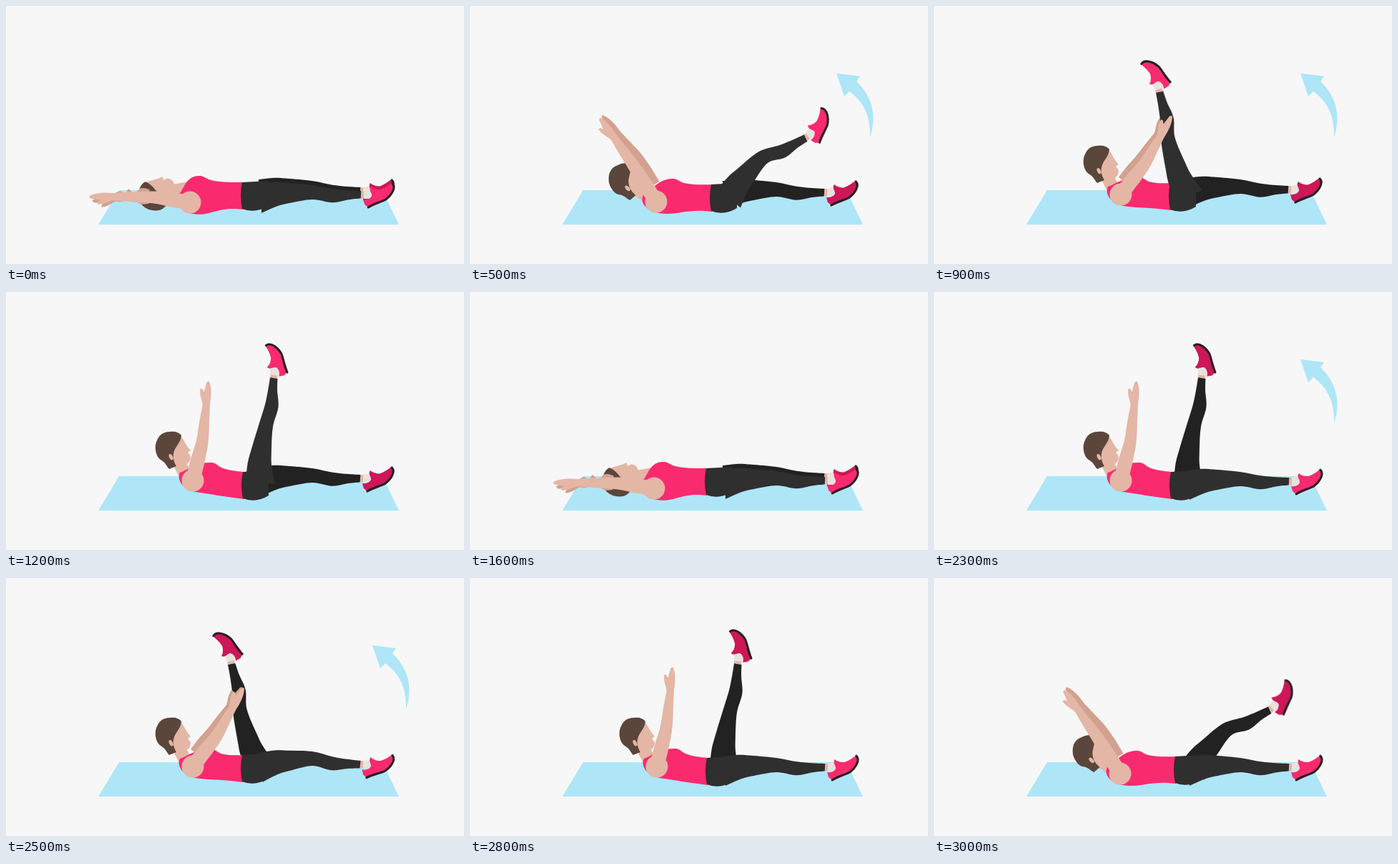
Recreate the animation shown at these times as an HTML page. Size 640 by 360 pixels, loop 3200 ms.

```html
<!DOCTYPE html>
<html lang="en">
<head>
<meta charset="utf-8">
<title>Single-leg stretch</title>
<style>
  html, body { margin: 0; width: 100%; height: 100%; overflow: hidden; background: #f7f7f7; }
  svg { display: block; width: 100%; height: 100%; }
</style>
</head>
<body>
<svg id="stage" viewBox="0 0 640 360"></svg>
<script>
const LOOP = 3200;
const MAT = '#aee6f8', SKIN = '#e4b6a5', TAN = '#d3a190', HAIR = '#5a463b', SOCK = '#e8e2df', SOLE = '#222';
const NEAR = { pants: '#2f2f2f', shoe: '#fa2a6e' };
const FAR = { pants: '#222222', shoe: '#cd1757' };

// Limb outlines: [place along the two bones 0..2, front width, back width].
const LEG = [[0, 20, 21], [.3, 20, 14], [.55, 17, 11.5], [1, 10, 10], [1.42, 6, 13], [1.75, 5, 8], [2, 5, 5.5]];
const ARM = [[0, 10, 10], [.5, 10, 10], [1, 8.5, 8.5], [1.5, 7, 7], [2, 5, 5]];

// Joints are [x, y]; a head is [x, y, turn].
const POSES = {
  lie: { waist: [330, 246], head: [211, 262, -75], neck: [255, 254], strap: [240, 263], bust: [271, 237],
    arm: [[257, 274], [207, 267], [148, 266]], farArm: [[200, 266], [172, 264], [152, 267]] },
  mid: { waist: [337, 249], head: [219, 244, -20], neck: [250, 268], strap: [242, 264], bust: [284, 241],
    arm: [[260, 273], [230, 225], [200, 182]], farArm: [[256, 250], [233, 212], [205, 177]],
    up: [[362, 268], [410, 211], [469, 184]], flex: -18 },
  top: { waist: [331, 251], head: [233, 220, 0], neck: [254, 262], strap: [243, 252], bust: [287, 238],
    arm: [[261, 263], [274, 210], [280, 156]],
    up: [[355, 266], [363, 187], [374, 120]] },
  hold: { waist: [330, 247], head: [233, 220, 0], neck: [254, 262], strap: [243, 252], bust: [287, 239],
    arm: [[261, 263], [294, 221], [317, 181]], farArm: [[266, 245], [288, 216], [313, 179]],
    up: [[355, 264], [327, 186], [315, 120]] }
};
const REST = [[355, 269], [428, 261], [496, 264]];
const REST_HOLD = [[355, 264], [428, 252], [495, 260]];
const REST_FAR = [[355, 264], [428, 256], [495, 260]];
const shifted = (joints, dy) => joints.map(([x, y]) => [x, y + dy]);

const path = (d, fill) => `<path d="${d}" fill="${fill}"/>`;
const place = ([x, y], turn, art) => `<g transform="translate(${x} ${y}) rotate(${turn})">${art}</g>`;
const angle = ([ax, ay], [bx, by]) => Math.atan2(by - ay, bx - ax);
const degrees = (a, b) => angle(a, b) * 180 / Math.PI;

// Smooth open curve through points, without its starting move.
function curve(pts) {
  const at = i => pts[Math.max(0, Math.min(pts.length - 1, i))];
  const handle = (i, dir) => at(i).map((v, k) => v + dir * (at(i + 1)[k] - at(i - 1)[k]) / 6);
  return pts.slice(1).map((p, i) => `C${handle(i, 1)} ${handle(i + 1, -1)} ${p}`).join('');
}

function limb([a, b, c], profile, fill) {
  const first = angle(a, b), second = angle(b, c);
  const edge = (u, width) => {
    const [from, to, t] = u < 1 ? [a, b, u] : [b, c, u - 1];
    const dir = u === 1 ? (first + second) / 2 : u < 1 ? first : second;
    return [from[0] + (to[0] - from[0]) * t + Math.sin(dir) * width,
            from[1] + (to[1] - from[1]) * t - Math.cos(dir) * width];
  };
  const front = profile.map(([u, w]) => edge(u, w));
  const back = profile.map(([u, , w]) => edge(u, -w)).reverse();
  return path(`M${front[0]}${curve(front)}L${back[0]}${curve(back)}Z`, fill);
}

const foot = color =>
  path('M-4,-5H6V5H-4Z', SKIN) +
  path('M4,-5L14,-7L18,-1L13,6L4,6Z', SOCK) +
  path('M14,-11C17,-8 23,-6 28,-7C34,-9 39,-13 43,-16L47,-14C49,-5 41,4 35,8C28,12 20,15 11,19L5,14L3,7C8,8 13,6 15,2C16,-2 10,-6 14,-11Z', color) +
  `<path d="M44,-15.5C50,-9 42,2 35,7C28,11 19,12 10,18" fill="none" stroke="${SOLE}" stroke-width="3" stroke-linecap="round"/>`;

const leg = (joints, side, flex = -3) =>
  place(joints[2], degrees(joints[1], joints[2]) + flex, foot(side.shoe)) + limb(joints, LEG, side.pants);

const arm = (joints, fill) => limb(joints, ARM, fill) +
  place(joints[2], degrees(joints[1], joints[2]),
    path('M-2,-5C6,-7 10,-11 20,-11L20,-8L16,-5L30,-3L32,0C24,5 12,6 -2,5Z', fill));

const head =
  path('M10,-21C16,-14 18,-6 25,1L21,4L25,9C25,18 20,20 16,20C10,26 4,26 -2,22L-2,0Z', SKIN) +
  path('M12,-20C11,-8 2,-4 1,6C0,12 2,18 5,23L-5,27C-10,21 -10,18 -17,14C-23,10 -25,0 -24,-7C-21,-19 -15,-25 -4,-25C3,-26 9,-24 12,-20Z', HAIR) +
  `<ellipse cx="-2.5" cy="10" rx="2.5" ry="4.5" transform="rotate(-25 -2 10)" fill="${SKIN}"/>`;

function torso({ waist: [wx, wy], strap: [sx, sy], bust: [bx, by], arm: [[ax, ay]] }) {
  return path(`M${sx},${sy}C${sx + 8},${sy - 2} ${bx - 22},${by - 1} ${bx},${by}
    C${bx + 12},${by + 1} ${bx + 4},${by + 10} ${wx + 1},${wy}V${wy + 38}
    C${wx - 35},${wy + 33} ${ax + 30},${ay + 20} ${ax + 4},${ay + 16}
    C${ax - 8},${ay + 14} ${sx - 6},${sy + 14} ${sx},${sy}Z`, NEAR.shoe);
}
const pelvis = ({ waist }) => place(waist, 0, path('M0,0Q-4,18 0,37Q18,44 36,33V-2Z', NEAR.pants));

function figure(name, nearLeg, farLeg, nearFlex, farFlex) {
  const pose = POSES[name], [shoulder] = pose.arm;
  return leg(farLeg, FAR, farFlex) +
    `<path d="M${pose.head.slice(0, 2)}L${pose.neck}" stroke="${SKIN}" stroke-width="18"/>` +
    place(pose.head, pose.head[2], head) +
    (pose.farArm ? arm(pose.farArm, TAN) : '') +
    torso(pose) + leg(nearLeg, NEAR, nearFlex) + pelvis(pose) +
    `<circle cx="${shoulder[0]}" cy="${shoulder[1]}" r="15.5" fill="${SKIN}"/>` + arm(pose.arm, SKIN);
}
const nearUp = (name, rest) => figure(name, POSES[name].up, rest, POSES[name].flex);
const farUp = (name, rest) => figure(name, rest, POSES[name].up, undefined, POSES[name].flex);

const scenes = {
  lie: figure('lie', shifted(REST, -1), shifted(REST_FAR, -2)),
  nearMid: nearUp('mid', REST_FAR),
  nearTop: nearUp('top', REST_FAR),
  nearHold: nearUp('hold', shifted(REST_FAR, -4)),
  farMid: farUp('mid', REST),
  farTop: farUp('top', REST),
  farHold: farUp('hold', REST_HOLD),
  arrow: path('M512,94L545,98L540,105C560,124 570,151 559,183C560,152 549,133 530,119L523,126Z', MAT)
};

// [start ms, pose, arrow shown]: the same half loop for each leg.
const steps = ['near', 'far'].flatMap((side, i) => [
  [0, 'lie'], [500, side + 'Mid', true], [700, side + 'Top', true], [900, side + 'Hold', true],
  [1200, side + 'Top'], [1400, side + 'Mid']
].map(([start, ...rest]) => [start + i * LOOP / 2, ...rest]));

const stage = document.getElementById('stage');
stage.innerHTML = path('M158,257H526L549,305H129Z', MAT) +
  Object.entries(scenes).map(([name, art]) => `<g id="${name}" opacity="0">${art}</g>`).join('');

for (const name of Object.keys(scenes)) {
  const shown = ([, pose, arrow]) => Number(name === 'arrow' ? !!arrow : pose === name);
  const frames = steps.map(s => ({ offset: s[0] / LOOP, opacity: shown(s), easing: 'step-end' }));
  frames.push({ offset: 1, opacity: shown(steps[steps.length - 1]) });
  document.getElementById(name).animate(frames, { duration: LOOP, iterations: Infinity }).startTime = 0;
}
</script>
</body>
</html>
```
